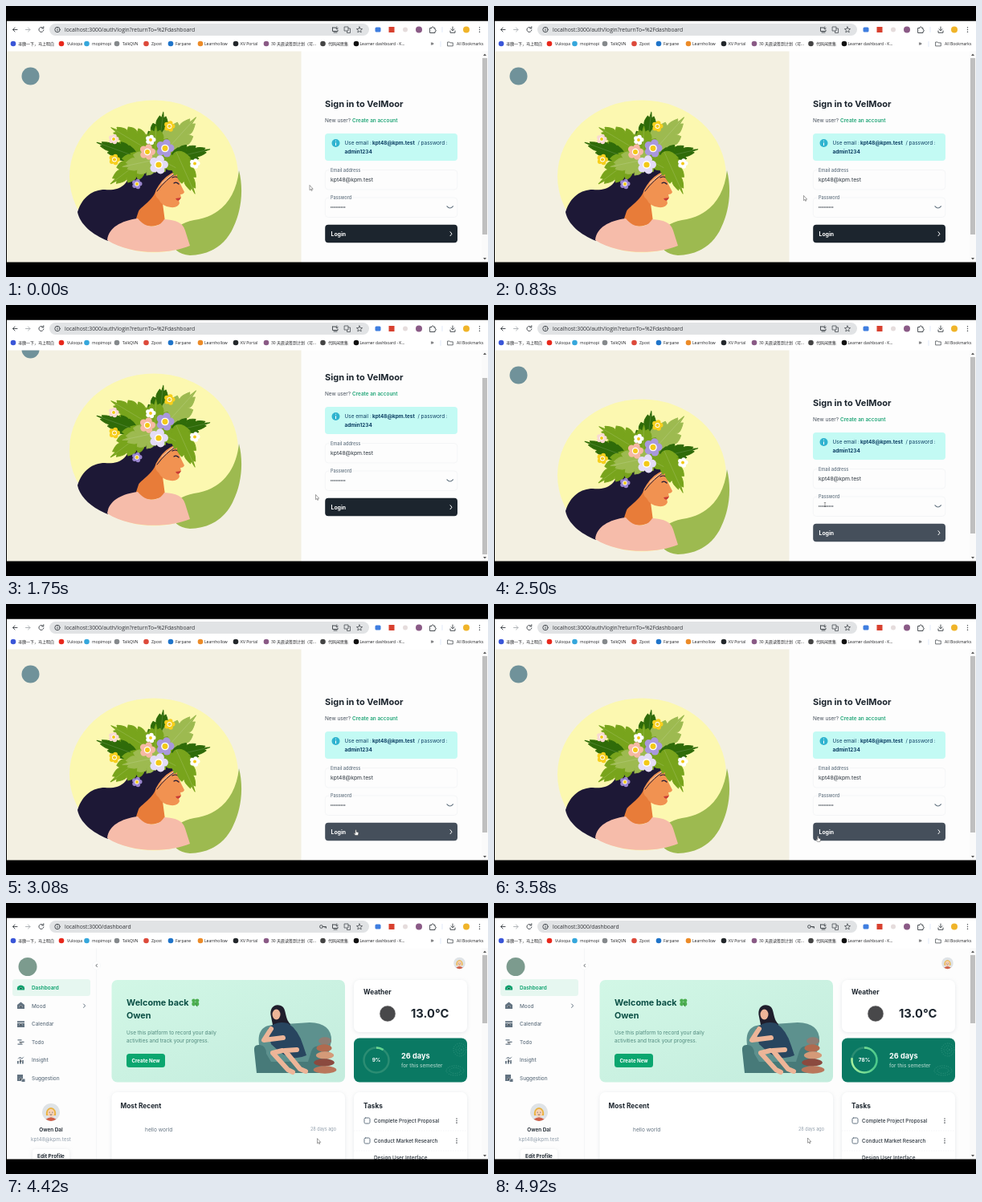
An HTML page that plays this animation: 600 by 338 pixels, repeating every 5000 ms.

```html
<!DOCTYPE html>
<html lang="en">
<head>
<meta charset="utf-8">
<title>Sign in</title>
<style>
html, body { margin: 0; width: 100%; height: 100%; overflow: hidden; background: #000; }
svg { display: block; width: 100%; height: 100%; }
text { font: 6.4px Inter, "Noto Sans CJK SC", sans-serif; fill: #637381; white-space: pre; }
#chrome text { font: 5px "Open Sans", "Noto Sans CJK SC", sans-serif; fill: #202124; }
#chrome #url { font-size: 6.8px; fill: #303236; }
.b { font-weight: 700; fill: #1c252e; }
.s { font-weight: 600; fill: #1c252e; }
.m { font-weight: 500; }
.h { font-size: 8.3px; }
.mid { text-anchor: middle; }
.ln { fill: none; stroke: #4b5055; stroke-width: 1; stroke-linecap: round; stroke-linejoin: round; }
.box { fill: none; stroke: #eef0f2; stroke-width: .6; }
.card { fill: #fff; filter: drop-shadow(0 1px 2.5px #919eab38); }
.note { fill: #0d3f64; }
</style>
</head>
<body>
<svg viewBox="0 0 600 338">
<defs>
  <linearGradient id="mint" x2="1" y2="1"><stop stop-color="#d2f7e6"/><stop offset="1" stop-color="#c3ecdd"/></linearGradient>
  <linearGradient id="ring" x2="0" y2="1"><stop stop-color="#a6ef9c"/><stop offset="1" stop-color="#48c98a"/></linearGradient>
</defs>
<rect y="56" width="600" height="264" fill="#fdfdfd"/>

<g id="login">
  <rect y="56" width="367.5" height="264" fill="#f3f0e2"/>
  <g id="page">
    <circle cx="30.5" cy="87.5" r="11" fill="#70929a"/>
    <ellipse cx="184" cy="212.5" rx="105" ry="95" fill="#fcf8b0"/>
    <path fill="#9dba50" d="M290 205C296 229 293 255 283 276C273 299 252 311 229 311C213 310 205 300 207 290C209 276 219 270 234 267C265 263 286 242 290 205Z"/>
    <path fill="#1d1836" d="M89 257C95 238 108 229 123 229C140 231 152 224 155 206L180 194L214 206Q201 212 194 223C191 237 183 247 169 256L165 266C145 270 133 277 127 293C107 285 92 272 89 257Z"/>
    <path fill="#e87c39" d="M187 229C183 243 168 250 165 256L161 268Q179 281 198 269L195 246Z"/>
    <path fill="#f6bcaa" d="M126 292C128 276 143 268 164 265C174 278 190 278 197 266C212 267 220 270 223 280L229 299C202 310 156 311 126 292Z"/>
    <path fill="#f19251" d="M190 224Q198 211 212 206L215 213L217 222L222 232Q221 235 217 235L218 239L215 242L216 246Q214 252 205 251Q194 250 190 241Q184 237 187 229Z"/>
    <path fill="#c83b35" d="M211 240l7-1-2 3q-3 2-5-2Z"/>
    <path class="ln" style="stroke:#1d1836;stroke-width:1.2" d="M207 214q4-2 7 0M209 221q3-2 6 1"/>
    <path class="ln" style="stroke:#1d1836" d="M188 231Q199 216 214 207"/>
    <path class="ln" style="stroke:#f3e9dc;stroke-width:.7" d="M194 221Q203 212 213 207"/>
    <g id="plants"></g>

    <text class="b" x="397" y="125.8" style="font-size:11px">Sign in to VelMoor</text>
    <text x="397" y="145" style="fill:#454f5b">New user?</text>
    <text class="s" x="431" y="145" style="fill:#20a577">Create an account</text>
    <rect x="397" y="159" width="165" height="34" rx="4" fill="#c3faf4"/>
    <circle cx="410.5" cy="171" r="5" fill="#2fb3cf"/>
    <path class="ln" style="stroke:#fff" d="M410.5 168.2v.1M410.5 170.7v3"/>
    <text class="note" x="421.5" y="173.2">Use email :</text>
    <text class="b note" x="456" y="173.2">kpt48@kpm.test</text>
    <text class="note" x="512.5" y="173.2">/ password :</text>
    <text class="b note" x="421.5" y="183.7">admin1234</text>
    <rect class="box" x="397.3" y="204.5" width="164.5" height="24.5" rx="4"/>
    <rect class="box" x="397.3" y="239" width="164.5" height="24.5" rx="4"/>
    <path stroke="#fdfdfd" stroke-width="2" d="M402 204.5h41M402 239h30"/>
    <text class="m" x="404" y="206.5" style="font-size:5.6px">Email address</text>
    <text x="404" y="219.2" style="font-size:6.8px;fill:#2b343d">kpt48@kpm.test</text>
    <text class="m" x="404" y="241" style="font-size:5.6px">Password</text>
    <path class="ln" style="stroke:#2b343d;stroke-width:1.5" stroke-dasharray="0 2.1" d="M404.8 251h17"/>
    <path class="ln" style="stroke:#637381;stroke-width:1.2" d="M549 249.8q3.7 4.4 7.4 0"/>
    <rect id="button" x="397.2" y="272.8" width="164.8" height="22.5" rx="4"/>
    <text class="b" x="404.5" y="286.7" style="font-size:6.9px;fill:#fff">Login</text>
    <path class="ln" style="stroke:#fff" d="M553 281.7l2 2.5-2 2.5"/>
  </g>
</g>

<g id="dash">
  <path stroke="#f1f3f4" stroke-width=".7" d="M112.6 56v264"/>
  <circle cx="27" cy="79.5" r="11.5" fill="#7c9b8e"/>
  <circle cx="112.6" cy="78" r="5" fill="#fff" stroke="#f0f2f4" stroke-width=".5"/>
  <path class="ln" style="stroke-width:.8" d="M113.5 76.2l-1.7 1.8 1.7 1.8"/>
  <rect x="8" y="95" width="97" height="21" rx="3.5" fill="#e6f7f0"/>
  <g id="nav"></g>
  <path class="ln" style="stroke:#637381" d="M96.6 126l2 2.2-2 2.2"/>
  <g id="face" transform="translate(56 261)">
    <circle r="11" fill="#dfe3e6"/>
    <path fill="#e9b23f" d="M-6 4C-8-9 8-9 6 4Z"/>
    <ellipse cy="1" rx="4.3" ry="5" fill="#f8d2b4"/>
    <path fill="#cf5f48" d="M-6.5 8.8Q0 3.5 6.5 8.8Q0 13-6.5 8.8Z"/>
    <path class="ln" style="stroke-width:.8" d="M-1.8 0v.4M1.8 0v.4M-1 3q1 .7 2 0"/>
  </g>
  <use id="small" href="#face"/>
  <text class="s mid" x="56" y="285.2">Owen Dal</text>
  <text class="mid" x="56" y="297.2" style="fill:#919eab">kpt48@kpm.test</text>
  <rect class="card" x="33" y="307" width="46" height="18" rx="4"/>
  <text class="b mid" x="56" y="318">Edit Profile</text>

  <g id="load">
    <rect x="272" y="187" width="168.5" height="2" rx="1" fill="#b3babf"/>
    <rect id="bar" y="187" height="2" rx="1" fill="#1c252e"/>
  </g>

  <g id="main">
    <rect x="131.5" y="96" width="290.5" height="127.5" rx="7" fill="url(#mint)"/>
    <text class="b" x="150" y="127.5" style="font-size:10.8px;fill:#0b4f45">Welcome back</text>
    <text class="b" x="150" y="144.2" style="font-size:10.8px;fill:#0b4f45">Owen</text>
    <g fill="#4caf50"><circle cx="233.6" cy="121.8" r="2.4"/><circle cx="238" cy="121.8" r="2.4"/><circle cx="233.6" cy="126" r="2.4"/><circle cx="238" cy="126" r="2.4"/></g>
    <path class="ln" style="stroke:#388e3c" d="M235.8 124q.2 3 2 5"/>
    <text x="150" y="163.8" style="fill:#508a7e">Use this platform to record your daily</text>
    <text x="150" y="173.8" style="fill:#508a7e">activities and track your progress.</text>
    <rect x="150" y="188" width="48" height="17" rx="3.5" fill="#0aa66f"/>
    <text class="b mid" x="174" y="198.7" style="font-size:6.2px;fill:#fff">Create New</text>

    <path fill="#5d918e" d="M316 182C311 160 320 152 334 152L378 149Q406 150 405 172L398 204H316Z"/>
    <path fill="#477a79" d="M309 184Q308 176 316 177Q324 178 324 188L330 198H376L380 185Q383 177 391 179Q398 182 394 192L391 212H312Z"/>
    <path fill="#1f1e2c" d="M330 142C327 130 335 125 342 128C350 131 346 143 354 151L350 160L332 152Z"/>
    <ellipse cx="336.5" cy="139" rx="5" ry="6.5" fill="#edb598"/>
    <path fill="#28455f" d="M326 157Q336 146 351 150Q364 158 370 178L374 190Q357 198 341 186L330 176Z"/>
    <path fill="none" stroke="#edb598" stroke-width="6" stroke-linecap="round" stroke-linejoin="round" d="M330 157L321 171L345 168M344 184L332 187L351 208L357 211M362 183L347 184L366 207L373 210"/>
    <g id="stones"></g>

    <rect class="card" x="433" y="96" width="141" height="65" rx="7"/>
    <text class="b h" x="445" y="114">Weather</text>
    <circle cx="475" cy="138" r="10" fill="#48484a" stroke="#dcdcdc" stroke-width=".6"/>
    <text class="b" x="504" y="143.2" style="font-size:14.7px">13.0°C</text>

    <rect x="433" y="168.5" width="141" height="55" rx="7" fill="#0a7963"/>
    <g fill="none" stroke="#5fb39c" stroke-width=".8" stroke-dasharray=".8 1.8" opacity=".75">
      <circle cx="565" cy="183" r="8"/><circle cx="565" cy="183" r="5"/><circle cx="565" cy="183" r="2"/>
      <ellipse cx="559" cy="209" rx="11" ry="6"/><ellipse cx="559" cy="209" rx="7" ry="3.5"/>
    </g>
    <g fill="none" stroke-width="2.5">
      <circle cx="461" cy="196" r="15.5" stroke="#2b8d73"/>
      <circle id="arc" cx="461" cy="196" r="15.5" stroke="url(#ring)" pathLength="100" transform="rotate(-90 461 196)"/>
    </g>
    <text class="b mid" id="pct" x="461" y="198.4" style="fill:#fff"></text>
    <text class="b" x="492" y="194.3" style="font-size:9.2px;fill:#fff">26 days</text>
    <text class="m" x="492" y="205.2" style="fill:#a8d2c7">for this semester</text>

    <rect class="card" x="131.5" y="236" width="290.5" height="100" rx="7"/>
    <text class="b h" x="142.5" y="256">Most Recent</text>
    <text x="173" y="285.4" style="font-size:6.6px">hello world</text>
    <text x="411" y="284.2" text-anchor="end" style="font-size:5.5px;fill:#919eab">28 days ago</text>
    <rect class="card" x="433" y="236" width="141" height="100" rx="7"/>
    <text class="b h" x="445" y="256">Tasks</text>
    <g id="tasks"></g>
  </g>
</g>

<g id="scroll">
  <rect x="592" y="56" width="8" height="264" fill="#fafafa"/>
  <path fill="#555" d="M594 62l2-2.5 2 2.5ZM594 314l2 2.5 2-2.5Z"/>
  <rect id="thumb" x="593" width="6" fill="#bfbfbf"/>
</g>

<g id="chrome">
  <rect y="18.500" width="600" height="38" fill="#fff"/>
  <path d="M0 0H600V18.500H1V319.500H600V338H0Z"/>
  <rect x="54" y="22" width="398" height="15" rx="7.5" fill="#e1e3e5"/>
  <g class="ln">
    <path d="M14 29.5H8.500M11 27l-2.500 2.500 2.500 2.500"/>
    <path stroke="#b0b4b8" d="M24.500 29.500H30M27.500 27l2.500 2.500-2.500 2.500"/>
    <path d="M46.200 27.500a3 3 0 1 0 .7 2.500M46.800 25.700v2.200h-2.200"/>
    <circle cx="64" cy="29.5" r="3.2"/><path d="M64 29.300v1.500M64 27.800v.1"/>
    <path d="M406.500 27h4M406.500 27v4.500h6.500v-1.500M408 33h4M411.800 26v2.800M410.500 27.700l1.300 1.300 1.300-1.300"/>
    <path stroke-width=".8" d="M421.500 26h4.500v5h-4.500ZM426 28h2.500v5.500h-4v-2"/>
    <path stroke-width=".8" d="M440 26l1 2.400 2.600.2-2 1.700.6 2.600-2.200-1.400-2.200 1.400.6-2.600-2-1.700 2.600-.2Z"/>
    <g id="key"><circle cx="392.500" cy="29.500" r="1.900"/><path d="M394.500 29.500h4v1.700M397 29.500v1.300"/></g>
    <path d="M528 27.500h2q0-2 1.500-1.500t1 1.500h1.500v2q1.500.2 1.300 1.300t-1.300 1v1.700h-6Z"/>
    <path d="M556 26v4.500M554 28.800l2 2 2-2M553 31v2.300h6V31"/>
    <path stroke-width="1.4" d="M589.500 26.700v.1M589.500 29.500v.1M589.500 32.300v.1"/>
    <path stroke-width=".7" stroke="#d3e0f5" d="M543 26.500v6M541 44.500v6"/>
    <path stroke-width=".8" d="M550 45h2.300l.8.900h3.200v4H550Z"/>
  </g>
  <rect x="459.5" y="26.5" width="7" height="6" rx="1.5" fill="#3f7ee0"/>
  <rect x="476.5" y="26" width="7" height="7" fill="#d8402f"/>
  <circle cx="497" cy="29.5" r="3" fill="#e5dcdc"/>
  <circle cx="514" cy="29.5" r="4" fill="#8a5a86"/>
  <circle cx="573" cy="29.5" r="4" fill="#f0b429"/>
  <text id="url" x="73" y="32"></text>
  <g id="marks"></g>
  <text x="528.500" y="49.300" style="font-size:7px;font-weight:600">»</text>
  <text x="561" y="48.900">All Bookmarks</text>
</g>

<g id="cursor" fill="#fff" stroke="#444" stroke-width=".5" stroke-linejoin="round">
  <path d="M0 0V6.200L1.400 5L2.300 7L3.200 6.600L2.300 4.700H4.200Z"/>
  <path d="M-.7 0q.7-.8 1.400 0v2.200l2.200.6q.6.3.4 1.200l-.6 2.600H-.6L-2.400 4.200q-.2-.8.7-.5l1 .7Z"/>
  <path d="M-1.200-2.500h2.400M0-2.500v5M-1.200 2.500h2.400"/>
</g>
</svg>

<script>
const $ = id => document.getElementById(id);
const show = (el, on) => { el.style.display = on ? '' : 'none'; };
const LOOP = 5000, OPEN = 3750, READY = 4330;

// A leaf with lobes that sweep from its base towards deg.
function leaf(x, y, deg, len, w, color) {
  const edge = u => w * Math.sin(Math.PI * u ** .7);
  let d = '';
  for (const side of [-1, 1]) {
    d += 'M0 0';
    for (let i = 0; i < 4; i++) {
      const a = i / 4.6, b = a + .24;
      d += `Q${a * len} ${side * edge(a + .08) * 1.15} ${b * len} ${side * edge(b)}`;
      d += `L${(b - .05) * len} ${side * edge(b) * .35}`;
    }
    d += `L${len} 0Z`;
  }
  return `<g transform="translate(${x} ${y}) rotate(${deg})"><path d="${d}" fill="${color}" stroke="${color}" stroke-linejoin="round"/>
    <path d="M0 0H${len * .9}" stroke="#fff" stroke-opacity=".22" stroke-width=".6"/></g>`;
}

function flower(x, y, r, color) {
  let s = '';
  for (let i = 0; i < 5; i++) {
    const a = i * Math.PI * .4 - 1.3;
    s += `<circle cx="${x + r * .58 * Math.cos(a)}" cy="${y + r * .58 * Math.sin(a)}" r="${r * .42}" fill="${color}"/>`;
  }
  return s + `<circle cx="${x}" cy="${y}" r="${r * .42}" fill="#fff"/><circle cx="${x}" cy="${y}" r="${r * .3}" fill="#f3c918"/>`;
}

const DARK = '#2f6b09', GREEN = '#78a41c', PALE = '#9dba50';
$('plants').innerHTML = [
  [190, 180, -83, 48, 16, DARK], [178, 180, -149, 55, 17, GREEN], [162, 188, -160, 52, 11, DARK],
  [195, 185, -48, 62, 19, PALE], [205, 190, -13, 50, 12, DARK], [175, 188, 143, 56, 17, GREEN],
  [212, 182, 66, 57, 14, GREEN], [178, 184, 28, 42, 15, GREEN], [185, 196, -88, 46, 22, GREEN],
  [194, 190, 168, 50, 17, PALE]
].map(a => leaf(...a)).join('') + [
  [134, 166, 6.5, '#f9d9d3'], [203.5, 150, 7, '#f7cf1d'], [180, 167, 6.5, '#fff'], [176, 182, 10, '#f6b9a4'],
  [198, 177.5, 11.5, '#a998dc'], [190, 198, 12, '#e4dcf7'], [135, 191.5, 7, '#f7cf1d'],
  [235, 196.5, 6.5, '#fff'], [163, 222, 6.5, '#9a86cf']
].map(a => flower(...a)).join('');

$('nav').innerHTML = [
  ['Dashboard', 'M-4.5 3a4.7 4.7 0 1 1 9 0Z'],
  ['Mood', 'M-4.5-1L0-4.5L4.5-1V4h-9Z'],
  ['Calendar', 'M-4.5-3.5h9V-1.5h-9ZM-4.5-.7h9V4.2h-9Z'],
  ['Todo', 'M-4-3h5v1.2h-5ZM-2-.5h6v1.2h-6ZM-4 2.2h6v1.2h-6Z'],
  ['Insight', 'M-4.5 1h1.8v3.5h-1.8ZM-1.5-1h1.8v5.5h-1.8ZM1.5 0h1.8v4.5h-1.8ZM-4.5-1.5L-1-4l2 1.5 3.5-2-3 3.2-2.5-1Z'],
  ['Suggestion', 'M-4.5-4.5h7v5h-2v3h-5ZM1 1h4v3.5h-4Z']
].map(([name, d], i) => {
  const y = 105.5 + 22.6 * i, color = i ? '#637381' : '#0aa06c';
  return `<g transform="translate(18.5 ${y})"><path fill="${color}" d="${d}"/>
    <path stroke="#fff" stroke-width=".7" opacity=".7" d="M-2.5 1.5L0 0 2.5 1.5"/></g>
    <text x="32" y="${y + 2.4}" class="${i ? 'm' : 's'}" style="fill:${color}">${name}</text>`;
}).join('');

$('stones').innerHTML = ['#8d7d74', '#b06a4f', '#d49a78', '#8b4a3f', '#b9775c'].map((c, i) =>
  `<ellipse cx="${397 - i % 2}" cy="${172 + i * 9}" rx="${8 + i * 1.6}" ry="4.7" fill="${c}"/>`).join('');

$('tasks').innerHTML = ['Complete Project Proposal', 'Conduct Market Research', 'Design User Interface'].map((name, i) => {
  const y = 271.5 + 25 * i - (i > 1 ? 3.5 : 0);
  return `<text x="458" y="${y + 2.4}" class="m" style="fill:#2b343d">${name}</text>` + (i > 1 ? '' :
    `<rect class="ln" style="stroke:#637381" x="446" y="${y - 3.5}" width="7" height="7" rx="1.6"/>
     <path class="ln" style="stroke-width:1.5" d="M561 ${y - 2.6}v.1M561 ${y}v.1M561 ${y + 2.6}v.1"/>
     <path stroke="#eef0f2" stroke-width=".6" stroke-dasharray="1.5 1.5" d="M433 ${y + 12.5}h141"/>`);
}).join('');

$('marks').innerHTML = [
  [9, 15, '#3a56d8', '寻鹿一下，马上明白'], [69, 76, '#e8281c', 'Vuloopa'], [100.5, 107, '#35a7dc', 'mopimopi'],
  [138, 145, '#85898c', 'TalkQVN'], [174.5, 181, '#dd4a3b', 'Zpost'], [205, 211, '#1f74c9', 'Farpane'],
  [242, 247, '#ec8b28', 'Learnhollow'], [286, 292, '#23272b', 'KV Portal'], [324, 330, '#8a5a86', '30 天晨读签到计划（可…'],
  [394.5, 401, '#444', '代码闲思集'], [436, 440.5, '#111', 'Learner dashboard - K...']
].map(([cx, x, color, name]) =>
  `<circle cx="${cx}" cy="47" r="3.3" fill="${color}"/><text x="${x}" y="48.9">${name}</text>`).join('');

// Values between keys [time, ...values], eased.
function track(keys, t) {
  const i = keys.findIndex(k => k[0] > t);
  if (i < 1) return keys.at(i).slice(1);
  const a = keys[i - 1], b = keys[i];
  let u = (t - a[0]) / (b[0] - a[0]);
  u *= u * (3 - 2 * u);
  return a.slice(1).map((v, j) => v + (b[j + 1] - v) * u);
}

// cubic-bezier(.65, .815, .735, .395)
function barEase(x) {
  const curve = (u, p, q) => 3 * u * (1 - u) ** 2 * p + 3 * u * u * (1 - u) * q + u ** 3;
  let lo = 0, hi = 1;
  for (let i = 0; i < 20; i++) {
    const u = (lo + hi) / 2;
    if (curve(u, .65, .735) < x) lo = u; else hi = u;
  }
  return curve(lo, .815, .395);
}

const SCROLL = [[1050, 0], [1380, 32], [2250, 32], [2480, 0]];
const HOVER = [[2160, 0], [2410, 1], [2500, 1], [2700, 0], [2780, 0], [3000, 1]];
const POINTER = [[500, 378, 223.5], [850, 385.5, 236.5], [2080, 385.5, 236.5], [2250, 412, 249], [2580, 412, 249],
  [2950, 435.5, 282], [3330, 435.5, 282], [3750, 386, 294], [4300, 386, 294], [4600, 390.5, 293]];
const SHAPES = [[2160, 0], [2400, 1], [2700, 2], [2790, 0], [READY, 1], [LOOP, 0]];

function draw(t) {
  const inside = t >= OPEN, ready = t >= READY;
  show($('login'), !inside);
  show($('dash'), inside);
  show($('key'), inside);
  show($('load'), !ready);
  show($('main'), ready);
  show($('scroll'), !inside || ready);
  $('url').textContent = 'localhost:3000/' + (inside ? 'dashboard' : 'auth/login?returnTo=%2Fdashboard');

  const [y] = track(SCROLL, t), [hover] = track(HOVER, t);
  $('page').setAttribute('transform', `translate(0 ${-y})`);
  $('thumb').setAttribute('y', 65 + (inside ? 0 : y * 26 / 32));
  $('thumb').setAttribute('height', inside ? 85 : 220);
  $('button').setAttribute('fill', `rgb(${28 + 41 * hover},${37 + 42 * hover},${46 + 45 * hover})`);

  const p = barEase(Math.min(1, Math.max(0, (t - OPEN) / 1260)));
  const left = Math.min(1, Math.max(0, 1.35 * p - .35)), right = Math.min(1, 1.9 * p);
  $('bar').setAttribute('x', 272 + 168.5 * left);
  $('bar').setAttribute('width', 168.5 * Math.max(0, right - left));
  $('small').setAttribute('transform', `translate(${ready ? 564.5 : 572} 75) scale(.66) translate(-56 -261)`);

  const [pct] = track([[READY, 0], [READY + 400, 78]], t);
  $('arc').setAttribute('stroke-dasharray', `${pct} 100`);
  $('pct').textContent = Math.round(pct) + '%';

  const shape = SHAPES.find(s => t < s[0])[1];
  [...$('cursor').children].forEach((el, i) => show(el, i === shape));
  $('cursor').setAttribute('transform', `translate(${track(POINTER, t)})`);
}

const start = performance.now();
function tick() {
  const t = (performance.now() - start) % LOOP;
  draw(Math.min(LOOP - 1, Math.floor(t * .012 + .06) / .012));
  requestAnimationFrame(tick);
}
tick();
</script>
</body>
</html>
```
